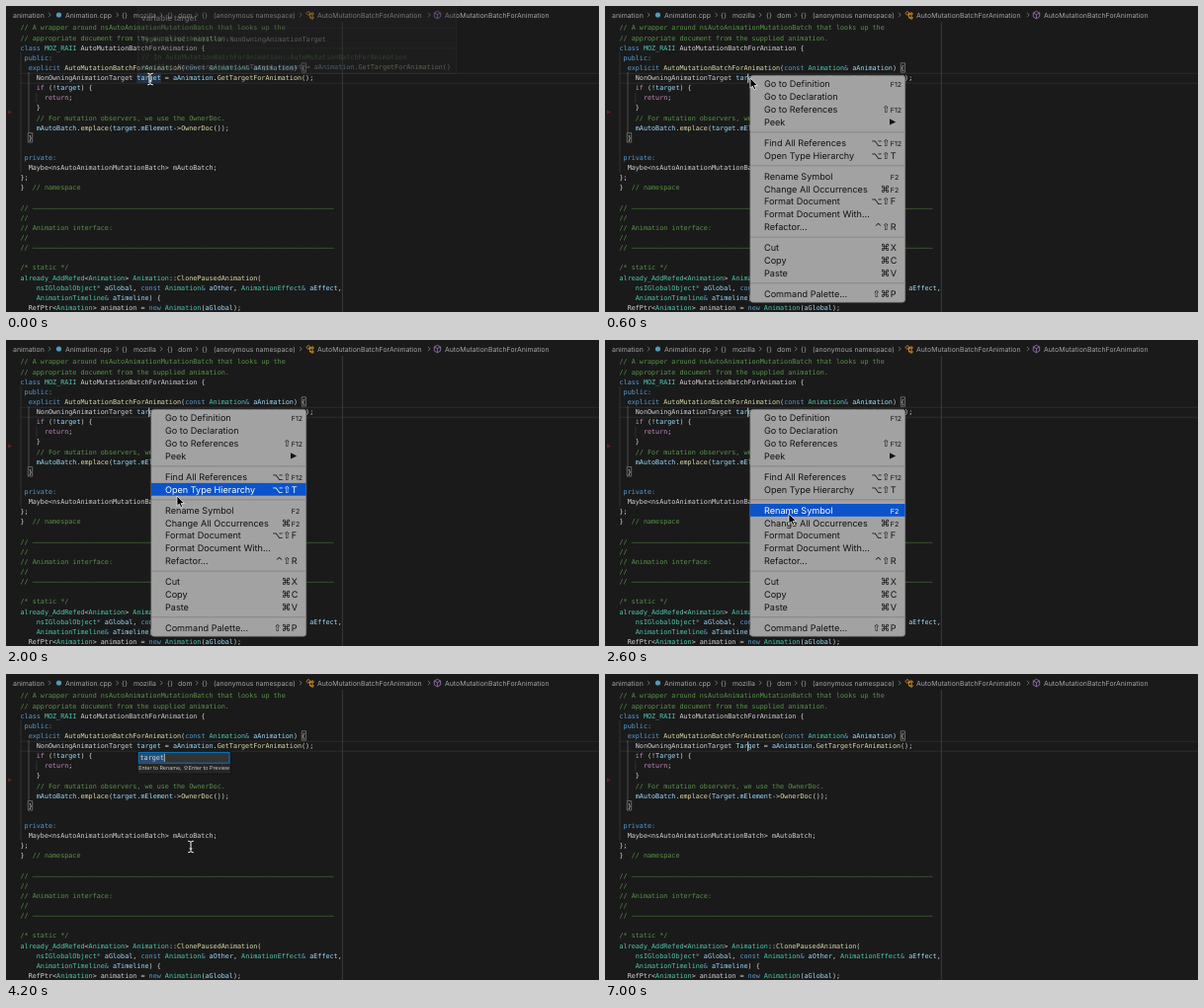
An HTML page that plays this animation: 600x310 px, repeating every 7.2 s.

```html
<!DOCTYPE html>
<html lang="en">
<head>
<meta charset="utf-8">
<title>Rename symbol</title>
<style>
  html, body { margin: 0; width: 100%; height: 100%; overflow: hidden; background: #1a1a1a; }
  svg { display: block; width: 600px; height: 310px; }
  text { white-space: pre; text-rendering: geometricPrecision; fill: #d4d4d4; }
  .code { font: 6.76px "DejaVu Sans Mono", monospace; }
  .crumb { font: 6.93px Inter, sans-serif; fill: #a4a4a4; }
  .hint { font: 5.4px Inter, "DejaVu Sans", sans-serif; fill: #ccc; }
  .item text { font: 9.1px Inter, "DejaVu Sans", sans-serif; fill: #111; }
  .item .fkey { font-size: 7px; }
  .item .mods { font: 9.5px "DejaVu Sans", sans-serif; text-anchor: end; }
  .item rect { fill: none; }
  .item path { fill: #111; }
  .item.on rect { fill: #0b53cb; }
  .item.on text { fill: #fff; }
  .item.on path { fill: #fff; }
  .k { fill: #569cd6; } .t { fill: #4ec9b0; } .f { fill: #dcdcaa; }
  .v, .n { fill: #9cdcfe; } .c { fill: #579447; } .p { fill: #c586c0; }
</style>
</head>
<body>
<svg viewBox="0 0 600 310">
  <rect width="600" height="310" fill="#1a1a1a"/>
  <g fill="none" stroke="#303030">
    <path d="M14 68.3H600M14 78.2H600" stroke-width=".8"/>
    <path d="M340.3 16V310" stroke="#444" stroke-width=".8"/>
    <path d="M15 47V169M30.9 88V98" stroke="#404040" stroke-width=".6"/>
    <path d="M23 67V128" stroke="#707070" stroke-width=".6"/>
    <path d="M299.3 57.8h4.2v9.4h-4.2zM22.3 128.6h4.4v9.4h-4.4z" stroke="#888" stroke-width=".7"/>
  </g>
  <path d="M2 105.5l4 2-4 2z" fill="#6a1c1c"/>
  <rect id="word" x="132.4" y="68.6" width="24.6" height="9.4" fill="#264f78" opacity=".45"/>
  <g id="crumbs"></g>
  <circle cx="53.5" cy="9" r="2.6" fill="#519aba"/>
  <path d="M304 7.5l2-2.2 2 2-2 2.2zM306.5 8h2.5M307.5 8v4h1.5M309 7h2v2h-2zM309 11h2v2h-2z" fill="none" stroke="#ee9d28" stroke-width=".8"/>
  <path d="M436.5 5.3l3.2 1.7v4l-3.2 1.8-3.2-1.8v-4zM433.3 7l3.2 1.7 3.2-1.7M436.5 8.7v4" fill="none" stroke="#b180d7" stroke-width=".7"/>
  <g id="code"></g>
  <rect id="caret" x="144.3" y="68.6" width=".9" height="9.4" fill="#ddd"/>

  <g id="hover">
    <rect x="133.3" y="-6" width="322.5" height="74.3" fill="#252526" stroke="#454545" stroke-width=".7"/>
    <path d="M133 22.4H456M133 42.8H456" stroke="#454545" stroke-width=".6"/>
    <text x="137" y="14.8" style="font:600 8px Inter,sans-serif">variable target</text>
  </g>

  <g id="rename">
    <rect x="133" y="78" width="94.5" height="23" fill="#252526" stroke="#111" stroke-width=".6"/>
    <rect x="134.4" y="79.6" width="91.6" height="10.6" fill="#333" stroke="#007fd4" stroke-width=".9"/>
    <rect id="selection" x="135.5" y="80.5" width="24.5" height="8.8" fill="#264f78"/>
    <text id="field" class="code" x="135.5" y="87.3"></text>
    <rect id="fieldCaret" y="80.8" width=".7" height="8.2" fill="#ddd"/>
    <text class="hint" x="134.2" y="97.2">Enter to Rename, ⇧Enter to Preview</text>
  </g>

  <g id="menu">
    <rect x="146.8" y="70.3" width="157" height="230" rx="3" fill="#a2a2a2" stroke="#6e6e6e" stroke-width=".6"/>
  </g>

  <path id="arrow" d="M0 0V10.2l2.3-2.1 1.7 3.7 1.7-.8-1.6-3.5h3.2z" fill="#000" stroke="#fff" stroke-width=".7"/>
  <g id="beam" fill="none">
    <path d="M-2.8-5.8Q0-5.8 0-4.4Q0-5.8 2.8-5.8M0-4.4V4.4M-2.8 5.8Q0 5.8 0 4.4Q0 5.8 2.8 5.8M-1.4 2H1.4" stroke="#111" stroke-width="2"/>
    <path d="M-2.8-5.8Q0-5.8 0-4.4Q0-5.8 2.8-5.8M0-4.4V4.4M-2.8 5.8Q0 5.8 0 4.4Q0 5.8 2.8 5.8M-1.4 2H1.4" stroke="#fff" stroke-width="1"/>
  </g>
</svg>
<script>
const $ = id => document.getElementById(id);
const LOOP = 7200, STEP = 200, CHAR = 4.07, LINE = 10.125;
const escape = s => s.replace(/&/g, '&amp;').replace(/</g, '&lt;');
const add = (id, markup) => $(id).insertAdjacentHTML('beforeend', markup);

// Each run starts with its colour class; runs are separated by "|".
const codeLine = (x, y, runs) => `<text class="code" x="${x}" y="${y}">` +
  runs.split('|').map(r => `<tspan class="${r[0]}">${escape(r.slice(1))}</tspan>`).join('') + '</text>';

const rule = 'c// ' + '–'.repeat(75);
const lines = [
  'c// A wrapper around nsAutoAnimationMutationBatch that looks up the',
  'c// appropriate document from the supplied animation.',
  'kclass |tMOZ_RAII |wAutoMutationBatchForAnimation {',
  'k public:',
  'k  explicit |fAutoMutationBatchForAnimation|w(|kconst |tAnimation|k& |vaAnimation|w) {',
  'w    NonOwningAnimationTarget |ntarget|w = |vaAnimation|w.|fGetTargetForAnimation|w();',
  'p    if|w (!|ntarget|w) {',
  'p      return|w;',
  'w    }',
  'c    // For mutation observers, we use the OwnerDoc.',
  'v    mAutoBatch|w.|femplace|w(|ntarget|w.|vmElement|w->|fOwnerDoc|w());',
  'w  }',
  'w',
  'k private:',
  'w  Maybe<nsAutoAnimationMutationBatch> mAutoBatch;',
  'w};',
  'w}  |c// namespace',
  'w',
  rule, 'c//', 'c// Animation interface:', 'c//', rule,
  'w',
  'c/* static */',
  'talready_AddRefed|w<|tAnimation|w> |tAnimation|w::|fClonePausedAnimation|w(',
  't    nsIGlobalObject|k* |vaGlobal|w, |kconst |tAnimation|k& |vaOther|w, |tAnimationEffect|k& |vaEffect|w,',
  't    AnimationTimeline|k& |vaTimeline|w) {',
  'w  RefPtr<|tAnimation|w> animation = |knew |tAnimation|w(|vaGlobal|w);'
];
add('code', lines.map((runs, i) => codeLine(14.5, 24.4 + i * LINE, runs)).join(''));

add('hover',
  codeLine(137, 35.6, 'wType: struct mozilla::NonOwningAnimationTarget') +
  codeLine(137, 53.6, 'c// In AutoMutationBatchForAnimation::AutoMutationBatchForAnimation') +
  codeLine(137, 63.7, 'tmozilla|w::NonOwningAnimationTarget |vtarget|w = |vaAnimation|w.|fGetTargetForAnimation|w()'));

const crumbs = [[7, 'animation'], [60, 'Animation.cpp'], [117, '{}'], [129, 'mozilla'], [163, '{}'], [174, 'dom'],
  [198, '{}'], [210, '(anonymous namespace)'], [315, 'AutoMutationBatchForAnimation'], [444, 'AutoMutationBatchForAnimation']];
add('crumbs', crumbs.map(([x, s]) => `<text class="crumb" x="${x}" y="11.5">${s}</text>`).join('') +
  [43, 111.5, 156, 192, 297, 427].map(x =>
    `<path d="M${x} 6.8l2.2 2.2-2.2 2.2" fill="none" stroke="#909090" stroke-width=".7"/>`).join(''));

const groups = [
  ['Go to Definition||F12', 'Go to Declaration||', 'Go to References|⇧|F12', 'Peek||▶'],
  ['Find All References|⌥⇧|F12', 'Open Type Hierarchy|⌥⇧|T'],
  ['Rename Symbol||F2', 'Change All Occurrences|⌘|F2', 'Format Document|⌥⇧|F', 'Format Document With...||', 'Refactor...|^⇧|R'],
  ['Cut|⌘|X', 'Copy|⌘|C', 'Paste|⌘|V'],
  ['Command Palette...|⇧⌘|P']
];
const items = [];
let itemY = 79;
groups.forEach((group, g) => {
  if (g) {
    add('menu', `<path d="M147 ${itemY - 2.3}H303.5" stroke="#858585" stroke-width=".9"/>`);
    itemY += 8.3;
  }
  for (const item of group) {
    const [label, mods, key] = item.split('|'), base = itemY + 3.3;
    const shortcut = key === '▶' ? `<path d="M288 ${itemY - 3.2}l6.2 3.2-6.2 3.2z"/>`
      : `<text class="${key.length > 1 ? 'fkey' : ''}" x="288.8" y="${base}">${key}</text>`;
    add('menu', `<g class="item"><rect x="147" y="${itemY - 6.4}" width="156.6" height="12.8"/>
      <text x="161" y="${base}">${label}</text><text class="mods" x="288.3" y="${base}">${mods}</text>${shortcut}</g>`);
    items.push({ y: itemY, node: $('menu').lastElementChild });
    itemY += 12.8;
  }
});

const path = [[0, 147, 73], [1000, 147, 73], [2000, 173, 158], [2600, 186, 176], [LOOP, 186, 176]];
function mouseAt(t) {
  const i = path.findIndex(p => p[0] > t), [t0, x0, y0] = path[i - 1], [t1, x1, y1] = path[i];
  const u = (t - t0) / (t1 - t0);
  return [x0 + (x1 - x0) * u, y0 + (y1 - y0) * u];
}

const show = (id, opacity) => {
  $(id).style.display = opacity ? '' : 'none';
  $(id).style.opacity = id === 'word' ? .45 : Number(opacity);
};
const place = (id, x, y) => $(id).setAttribute('transform', `translate(${x} ${y})`);
const names = document.querySelectorAll('#code .n');

function draw(t) {
  const menuOpen = t >= 600 && t < 3200, [x, y] = mouseAt(t);
  show('hover', t < 200 ? .35 : t < 600);
  show('word', t < 600);
  show('caret', t < 3000 || t >= 6400);

  show('menu', menuOpen ? 1 : t === 3200 ? .05 : 0);
  items.forEach(m => m.node.classList.toggle('on', Math.abs(y - 1 - m.y) < 6.4));
  show('arrow', menuOpen);
  place('arrow', x, y);
  show('beam', t < 600 || t >= 3200 && t < 4400);
  place('beam', t < 600 ? 146 : 187, t < 600 ? 74 : 175);

  const typing = t >= 4400;
  const typed = typing ? 'Target'.slice(0, 1 + (t - 4400) / STEP) : 'target';
  show('rename', t >= 3400 && t < 6200);
  show('selection', !typing);
  $('field').textContent = typed;
  show('fieldCaret', t % 1000 < 500);
  $('fieldCaret').setAttribute('x', 135.5 + typed.length * CHAR);
  names.forEach(n => n.textContent = t >= 6400 ? 'Target' : 'target');
}

const start = performance.now();
function frame() {
  draw(Math.floor((performance.now() - start) % LOOP / STEP) * STEP);
  requestAnimationFrame(frame);
}
frame();
</script>
</body>
</html>
```
